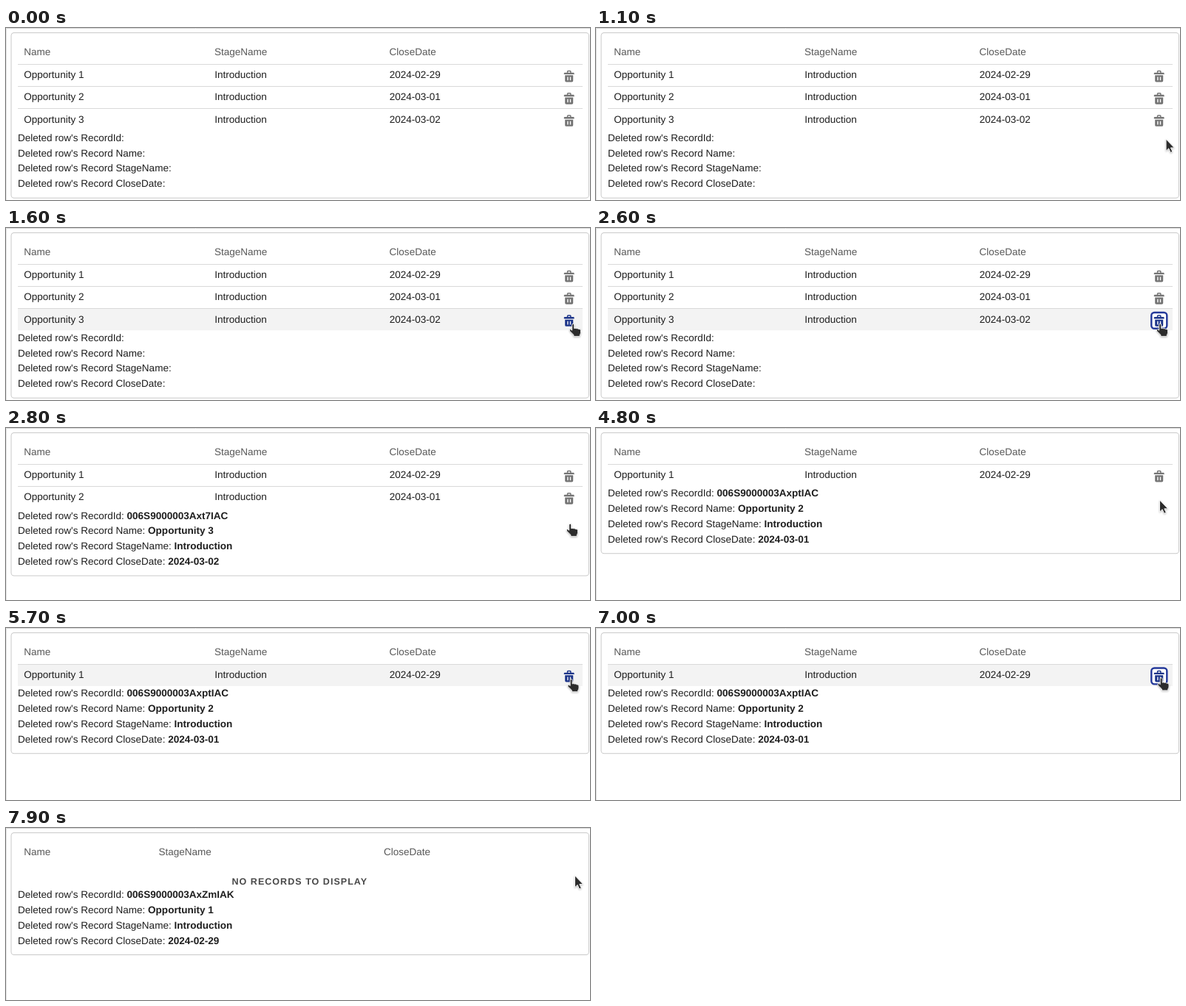
Recreate the animation shown at these times as an HTML page. Size 790 by 234 pixels, loop 8 s.

```html
<!DOCTYPE html>
<html lang="en">
<head>
<meta charset="utf-8">
<title>Delete rows</title>
<style>
  html, body { margin: 0; width: 100%; height: 100%; overflow: hidden; background: #fff; }
  svg { display: block; width: 790px; height: 234px; }
  text { font: 13.53px "Liberation Sans", Arial, sans-serif; fill: #1e1e1e; white-space: pre; text-rendering: geometricPrecision; }
  .head { fill: #585858; }
  .empty { font-size: 12.5px; font-weight: bold; letter-spacing: 1.04px; fill: #484848; }
  .bold { font-weight: bold; }
  .line { stroke: #d9d9d9; }
  #cursor { fill: #2c2c2c; stroke: #fff; stroke-width: .9; filter: drop-shadow(.5px 1px 1px #0004); }
</style>
</head>
<body>
<svg viewBox="0 0 790 234">
  <defs>
    <path id="trash" fill-rule="evenodd" d="
      M-7-3.4Q-7-4.9-6.2-4.9H-2.9V-6.3Q-2.9-7.8-1.4-7.8H1.4Q2.9-7.8 2.9-6.3V-4.9H6.2Q7-4.9 7-3.4T6.2-2.5H-6.2Q-7-2.5-7-3.4Z
      M-1.4-4.9H1.4V-6.3H-1.4Z
      M-5.5-1.2H5.5V6.2Q5.5 7.9 3.8 7.9H-3.8Q-5.5 7.9-5.5 6.2Z
      M-2.5.9H-1.1V5.6H-2.5Z M1.1.9H2.5V5.6H1.1Z"/>
  </defs>
  <path d="M0 .5H790" stroke="#d8d8d8"/>
  <path d="M.5 0V234" stroke="#e6e6e6"/>
  <!-- The tiny rotation keeps text baselines at fractional heights -->
  <g id="scene" transform="rotate(.002)"></g>
  <path id="cursor"/>
</svg>
<script>
const LOOP = 8000, PITCH = 30.2, ICON_X = 761.7;
const scene = document.getElementById('scene');
const cursor = document.getElementById('cursor');

const records = [
  { id: '006S9000003AxZmIAK', name: 'Opportunity 1', stage: 'Introduction', date: '2024-02-29' },
  { id: '006S9000003AxptIAC', name: 'Opportunity 2', stage: 'Introduction', date: '2024-03-01' },
  { id: '006S9000003Axt7IAC', name: 'Opportunity 3', stage: 'Introduction', date: '2024-03-02' },
];
const clicks = [2600, 4600, 6900];
const removals = [2800, 4700, 7200];

// Pointer moves: start, end, from, to
const moves = [
  [950, 1600, [775, 165], [765.5, 132]],
  [1800, 2200, [765.5, 132], [761.5, 132]],
  [3100, 3800, [761.5, 132], [762.5, 98.3]],
  [5100, 5900, [762.5, 98.3], [763, 69.6]],
  [7250, 7900, [763, 69.6], [769.5, 65]],
];
const ARROW = 'M0-.3V15.8L3.6 12.4 6.1 18 8.8 16.8 6.3 11.5H11.2Z';
const HAND = 'M.2 0Q.2-1.8 1.7-1.8Q3.2-1.8 3.2 0V4.6Q4.6 3.8 6 4.7Q7.6 4.1 8.8 5.4Q11.8 5 12 7.4V10.4' +
  'Q11.8 12.4 10.8 13.4V15.4H2.4V13.4L-2.8 8.3Q-3.8 6.2-1.8 5.6L.2 7.2Z';

const label = (x, y, content, cls = '') => `<text x="${x}" y="${y}" class="${cls}">${content}</text>`;
const iconY = i => 65.5 + PITCH * i;

function pointer(t) {
  const [start, end, from, to] = moves.findLast(m => t >= m[0]) || moves[0];
  const p = Math.min(1, Math.max(0, (t - start) / (end - start)));
  const ease = 1 - (1 - p) ** 2;
  return from.map((v, i) => v + (to[i] - v) * ease);
}

function row(record, i, hovered, active, focused) {
  const top = 49.3 + PITCH * i, base = 68.2 + PITCH * i;
  return (hovered ? `<rect x="16" y="${top}" width="764" height="${PITCH - .6}" fill="#f3f3f3"/>` : '') +
    `<path class="line" d="M16 ${Math.floor(top) + .5}H780"/>` +
    label(24.3, base, record.name) + label(282.2, base, record.stage) + label(518.7, base, record.date) +
    `<g transform="translate(${ICON_X} ${iconY(i)})" fill="${active ? '#1c3489' : '#747474'}">` +
    (focused ? '<rect x="-10.4" y="-11" width="21" height="21.8" rx="4" fill="#fff" stroke="#24399a" stroke-width="2.4"/>' : '') +
    '<use href="#trash"/></g>';
}

function draw(count, hovered, active, focused) {
  const bottom = count ? 140.6 + PITCH * count : 172.5;
  const first = count ? 63.2 + PITCH * count : 95.3;
  const gone = records[count] || {};
  const columns = count ? [24.2, 282, 518.6] : [24.2, 206.5, 511];
  const details = [['Id', gone.id], [' Name', gone.name], [' StageName', gone.stage], [' CloseDate', gone.date]];
  scene.innerHTML =
    `<rect x="7" y="6.5" width="781.5" height="${bottom - 6.5}" rx="4" fill="#fff" stroke="#c9c9c9"/>` +
    ['Name', 'StageName', 'CloseDate'].map((s, i) => label(columns[i], 37.3, s, 'head')).join('') +
    records.slice(0, count).map((r, i) => row(r, i, i === hovered, i === active, i === focused)).join('') +
    (count ? '' : label(305.5, 76.6, 'NO RECORDS TO DISPLAY', 'empty')) +
    details.map(([key, value], i) => label(16, first + 20.8 * i,
      `Deleted row's Record${key}: <tspan class="bold">${value || ''}</tspan>`)).join('');
}

let shown = '';
function frame(now) {
  const t = now % LOOP;
  const [x, y] = pointer(t);
  const visible = t >= 1000;
  const count = 3 - removals.filter(r => t >= r).length;
  const over = visible ? Math.floor((y - 49.3) / PITCH) : -1;
  const hovered = over < count ? over : -1;
  const active = hovered >= 0 && Math.hypot(x - ICON_X, y - iconY(hovered)) < 13 ? hovered : -1;
  const focused = clicks.some((c, i) => t >= c && t < removals[i]) ? active : -1;

  const state = [count, hovered, active, focused];
  if (state.join() !== shown) {
    shown = state.join();
    draw(...state);
  }
  // The hand lingers briefly after its row has gone
  const hand = active >= 0 || removals.some(r => t >= r && t < r + 100);
  cursor.setAttribute('d', hand ? HAND : ARROW);
  cursor.setAttribute('transform', `translate(${x} ${y})`);
  cursor.style.visibility = visible ? 'visible' : 'hidden';
  requestAnimationFrame(frame);
}
frame(performance.now());
</script>
</body>
</html>
```
